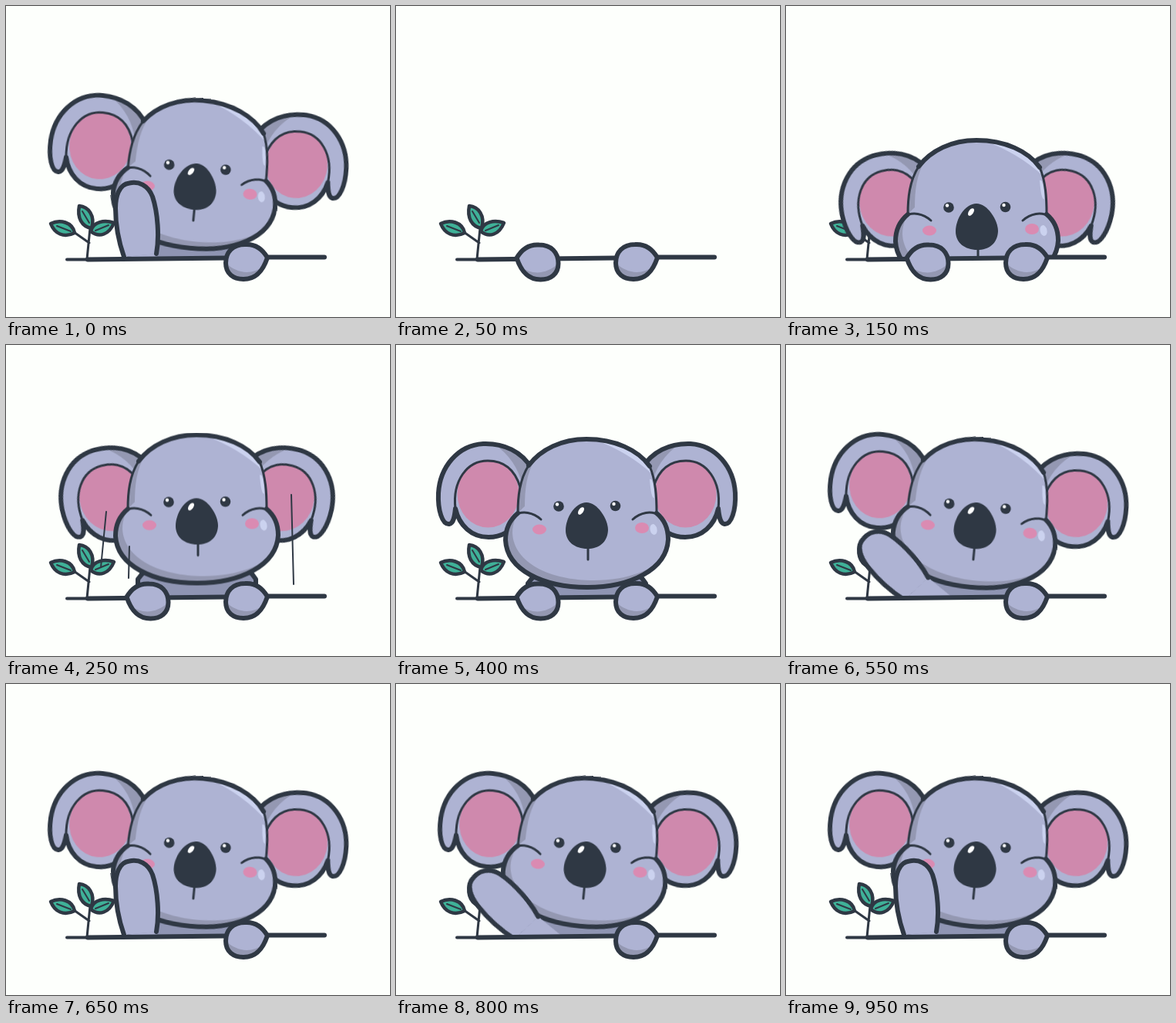
An HTML page that plays this animation: 498 px wide and 403 px high, repeating every 1 s.

```html
<!DOCTYPE html>
<html lang="en">
<head>
<meta charset="utf-8">
<title>Waving koala</title>
<style>
html, body { margin: 0; width: 100%; height: 100%; overflow: hidden; background: #fdfffc; }
svg { display: block; width: 498px; height: 403px; }
.ink { fill: none; stroke: #2f3844; stroke-width: 6; stroke-linecap: round; stroke-linejoin: round; }
.fine { stroke-width: 3; }
.fur { fill: #aeb3d3; }
.shade { fill: #9498b2; }
.dark { fill: #2f3844; }
.pink { fill: #cf89ad; }
.cheek { fill: #da8bb2; }
.glow { fill: #cbd2ef; }
.leaf { fill: #3fb198; stroke-width: 4.5; }

/* Every pose is held for 50 ms, which is 5% of the loop. */
#koala, .ear, #arm, #paw, #dash { animation: 1s step-end infinite; }
#koala { animation-name: rise; transform-origin: 247px 230px; }
.ear { animation-name: flap; transform-origin: 165px 180px; }
#arm { animation-name: wave; transform-origin: 175px 320px; }
#paw { animation-name: rest; }
#dash { animation-name: whoosh; }

@keyframes rise {
  0%, 55%, 100% { transform: translate(-1.5px, 0) rotate(5.5deg); }
  5% { transform: translateY(230px); }
  10% { transform: translateY(120px); }
  15% { transform: translateY(52px); }
  20% { transform: translateY(8px); }
  25% { transform: translateY(-5.5px); }
  30% { transform: translateY(-3px); }
  35% { transform: translateY(-1px); }
  40% { transform: none; }
  45% { transform: translate(-.5px, 0) rotate(1.5deg); }
  50% { transform: translate(-1px, 0) rotate(4deg); }
}
@keyframes flap {
  0%, 35%, 100% { transform: none; }
  5% { transform: translate(11px, -1px) rotate(-15deg); }
  30% { transform: translate(5px, -1px) rotate(-7deg); }
}
@keyframes wave {
  0%, 65%, 90%, 100% { transform: none; visibility: visible; }
  5% { transform: none; visibility: hidden; }
  50%, 60%, 75%, 85% { transform: translate(-3.5px, -3.5px) rotate(-19deg); visibility: visible; }
  55%, 80% { transform: translate(-7px, -7px) rotate(-38deg); visibility: visible; }
}
@keyframes rest {
  0%, 50%, 100% { visibility: hidden; }
  5% { visibility: visible; }
}
@keyframes whoosh {
  0%, 30%, 100% { visibility: hidden; }
  20% { visibility: visible; }
}
</style>
</head>
<body>
<svg viewBox="0 0 498 403">
  <defs>
    <path id="skull" d="M172 156C188 135 215 122 247 122C284 122 314 136 329 157C337 176 338 197 338 218C349 227 353 239 353 252C351 291 304 314 248 314C190 314 144 291 142 253C142 239 147 227 158 218C158 197 160 175 172 156Z"/>
    <path id="earLine" d="M176 160C163 138 140 127 113 128C80 130 57 158 55 192C54 214 60 233 69 232C75 231 76 222 77 212C82 234 98 249 120 249C138 249 150 240 157 228"/>
    <path id="pad" d="M339 326C332 314 323 308 310 309C294 309 285 319 285 333C285 347 295 354 308 354C326 354 334 341 339 326Z"/>
    <path id="sleeve" d="M153 325C146 305 142 285 142 262C142 248 146 231 160 229.5C172 227 184 232 190 247C197 268 199 300 195 321"/>
    <clipPath id="inside"><use href="#skull"/></clipPath>
    <clipPath id="above"><path d="M0 0H498V326H0Z"/></clipPath>
    <g id="earArt">
      <use href="#earLine" class="fur"/>
      <path class="fur" d="M157 228L176 160L190 200Z"/>
      <path class="shade" d="M128 129Q160 133 176 158L164 182Q156 148 128 129Z"/>
      <ellipse class="pink" cx="119.500" cy="193" rx="40" ry="43.500"/>
      <path class="ink fine" d="M77 212C73 176 92 150 119 150C139 150 154 161 161 184"/>
      <use href="#earLine" class="ink"/>
    </g>
    <g id="pawArt">
      <use href="#pad" class="fur"/>
      <path class="shade" d="M285 333C285 347 295 354 308 354C324 354 330 345 335 337C318 349 300 347 285 333Z"/>
      <use href="#pad" class="ink"/>
    </g>
  </defs>

  <g class="ink fine">
    <path d="M105 328L109 288M108 307L88 293"/>
    <path class="leaf" d="M58 282C70 276 86 280 89 294C75 301 63 295 58 282Z"/>
    <path class="leaf" d="M95 259C107 260 116 272 111 288C98 286 92 274 95 259Z"/>
    <path class="leaf" d="M140 281C128 277 113 279 110 292C121 301 134 296 140 281Z"/>
    <path d="M66 285L84 292M99 266L108 281M133 284L116 291" style="stroke-width:2"/>
  </g>

  <g clip-path="url(#above)">
    <g id="koala">
      <g class="ear"><use href="#earArt"/></g>
      <g transform="matrix(-1 0 0 1 495 0)">
        <g class="ear"><use href="#earArt"/></g>
      </g>
      <path class="ink" style="fill:#8f95b3" d="M171 420V309Q180 296 197 288H299Q316 296 324 309V420Z"/>
      <use href="#skull" class="shade"/>
      <g clip-path="url(#inside)">
        <use href="#skull" class="fur" transform="translate(9 -9)"/>
        <path class="fur" d="M190 200H348V278H190Z"/>
        <path class="glow" d="M258 123Q312 130 333 168Q302 139 258 123Z"/>
      </g>
      <path class="ink fine" d="M172 156C160 175 158 197 158 218M329 157C337 176 338 197 338 218"/>
      <path class="ink" d="M172 156C188 135 215 122 247 122C284 122 314 136 329 157M338 218C349 227 353 239 353 252C351 291 304 314 248 314C190 314 144 291 142 253C142 239 147 227 158 218"/>
      <path class="ink fine" d="M153 221C164 214 178 217 188 226M342 221C331 214 317 217 307 226"/>
      <ellipse class="cheek" cx="186" cy="239" rx="9" ry="6.500"/>
      <ellipse class="cheek" cx="319" cy="237" rx="9" ry="7"/>
      <ellipse class="glow" cx="334" cy="239" rx="4.500" ry="7" transform="rotate(-12 334 239)"/>
      <path class="glow" d="M329 174Q334 172 335 198Q331 200 329 174Z"/>
      <circle class="dark" cx="211" cy="209" r="6.800"/>
      <circle class="dark" cx="284.500" cy="208.500" r="6.800"/>
      <circle cx="209" cy="206.500" r="2.200" fill="#fff"/>
      <circle cx="282.500" cy="206" r="2.200" fill="#fff"/>
      <path class="ink fine" d="M249 262V278"/>
      <path class="dark" d="M247 204C261 204 275 225 275 240C274 256 263 264 248 264C232 264 220 255 220 240C220 224 232 204 247 204Z"/>
      <ellipse cx="240" cy="215" rx="3" ry="5.500" fill="#fff" transform="rotate(35 240 215)"/>
    </g>
    <g id="arm">
      <use href="#sleeve" class="fur"/>
      <path class="fur" d="M153 325L160 365H205L195 321Z"/>
      <use href="#sleeve" class="ink"/>
    </g>
  </g>

  <path class="ink" style="stroke-width:4" d="M79 328.500H106"/>
  <path class="ink" d="M106 328.500L285 326.500M338 325.500H413"/>
  <use href="#pawArt"/>
  <g id="paw"><use href="#pawArt" transform="matrix(-1 0 0 1 495.500 .500)"/></g>

  <path id="dash" class="ink" style="stroke-width:2" d="M130 216L123 288M160 261L159 302M370 194L373 310"/>
</svg>
</body>
</html>
```
